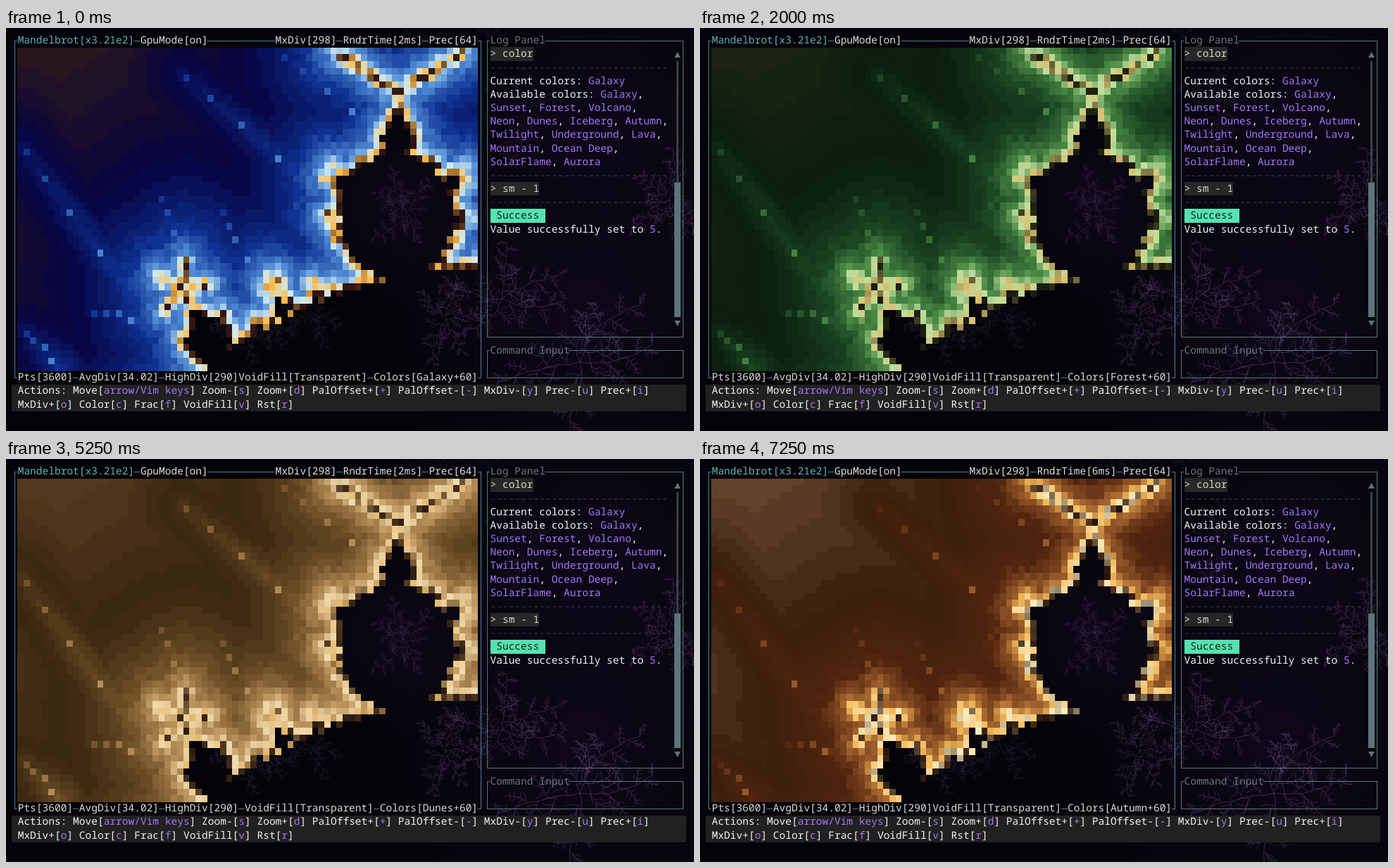
Write an HTML page with a canvas that moves like this. It is 977 by 573 pixels and loops after 8 s.

```html
<!DOCTYPE html>
<html lang="en">
<head>
<meta charset="utf-8">
<title>Fractal explorer</title>
<style>
html, body { margin: 0; width: 100%; height: 100%; overflow: hidden; background: #040309; }
canvas { position: absolute; left: 0; top: 0; }
span {
  position: absolute; white-space: pre; height: 19.16px;
  font: 500 14.52px/19.16px "Noto Sans Mono", "DejaVu Sans Mono", monospace;
  text-rendering: geometricPrecision; font-variant-ligatures: none;
}
</style>
</head>
<body>
<canvas id="back" width="977" height="573"></canvas>
<canvas id="view" width="977" height="573"></canvas>
<script>
const W = 977, H = 573, CW = 8.712, RH = 19.16, X0 = 8, Y0 = 8.7;
const COLS = 75, ROWS = 48, LOOP = 8000, DEG = Math.PI / 180;
const colX = c => X0 + c * CW, rowY = r => Y0 + r * RH;
const back = document.getElementById('back').getContext('2d');
const view = document.getElementById('view').getContext('2d');

let seed = 7;
const rnd = () => (seed = (seed * 16807) % 2147483647) / 2147483647;
const clamp = (v, lo, hi) => Math.max(lo, Math.min(hi, v));
const polar = (x, y, a, r) => [x + Math.cos(a) * r, y - Math.sin(a) * r];

// name, start time, render time, cyclic colours from the far exterior inwards
const THEMES = [
  ['Galaxy', 0, 2, '2f1a16 070340 0d3090 4f8ad4 d0ecf4 fcbc50 301410'],
  ['Sunset', 1130, 2, '46160f 22091f 5a2236 b4546e f6b0b0 fcb050 3a0c14'],
  ['Forest', 2000, 2, '1e2612 0a1c0e 1a4422 4a8a44 c0e0a0 d8c070 181c0c'],
  ['Volcano', 3000, 2, '3c140c 240c05 641a0c c04c1a f8a838 ffe27c 1c0a08'],
  ['Neon', 4250, 2, '3a2450 0c0b1e 16265a 5a5cac dcc4f2 d894e0 1c0a28'],
  ['Dunes', 5250, 2, '5a3c20 38260f 705028 bc945c f0dcb0 e4b870 2c1c10'],
  ['Iceberg', 6250, 4, '021420 28343c 62989f c8e6ec ecfaff 48b4cc 142848'],
  ['Autumn', 7250, 6, '6c4a32 3a200c 50240f a0602c f4bc5c faecc0 241208']
].map(([name, at, ms, hex]) => ({
  name, at, ms,
  stops: hex.split(' ').map(h => [0, 2, 4].map(i => parseInt(h.substr(i, 2), 16)))
}));

// ---- the set, in cell units: bulbs grow smaller bulbs, and each ends in an antenna ----
const discs = [], spikes = [];
const gcd = (a, b) => b ? gcd(b, a % b) : a;

function antenna(x, y, r, dir, q) {
  const fade = 0.25 + 0.35 / r;
  const hub = polar(x, y, dir, r * (1.1 + 0.3 * Math.min(q, 6)));
  spikes.push([...polar(x, y, dir, r), ...hub, fade]);
  for (let k = 1; k < q; k++)
    spikes.push([...hub, ...polar(...hub, dir + Math.PI + 2 * Math.PI * k / q, 1.25 * r), fade]);
}

function bulb(x, y, r, dir, q) {
  discs.push([x, y, r]);
  if (q > 2) antenna(x, y, r, dir, q);
  for (let n = 2; n < 15; n++) {
    const size = 1.06 * r / (n * n);
    if (size < 0.3) break;
    for (let p = 1; p < n; p++) {
      if (gcd(p, n) > 1) continue;
      const a = dir + Math.PI + 2 * Math.PI * p / n;
      const [cx, cy] = polar(x, y, a, r + 0.95 * size);
      if (cx > -2 && cx < COLS + 6 && cy > -2 && cy < ROWS + 2)
        bulb(cx, cy, size, a - 0.02 * size, n);
    }
  }
}
bulb(77, 111.2, 78.6, 160 * DEG, 1);

// thin filaments from faint tip to base
const THREADS = [
  [26.8, 4, 47, 19.2], [0.5, 14.5, 17, 34.5], [23.5, 22.3, 27, 32.5], [33.3, 24.2, 38, 33],
  [1, 41.8, 7, 47.6], [42.6, 1, 58, 11.5], [12, 39.3, 20, 40.2]
];

function segment(x, y, [ax, ay, bx, by]) {
  const dx = bx - ax, dy = by - ay;
  const t = clamp(((x - ax) * dx + (y - ay) * dy) / (dx * dx + dy * dy), 0, 1);
  return [Math.hypot(x - ax - t * dx, y - ay - t * dy), t];
}

// palette position of a cell, or -1 inside the set
function level(x, y) {
  let d = Math.min(...discs.map(([cx, cy, r]) => Math.hypot(x - cx, y - cy) - r));
  if (d < 0) return -1;
  for (const s of spikes) d = Math.min(d, segment(x, y, s)[0] + s[4]);
  for (const s of THREADS) {
    const [off, t] = segment(x, y, s);
    d = Math.min(d, 2 * off + 11 - 6 * t);
  }
  const a = rnd(), b = rnd();
  let p = 6.6 - 1.2 * Math.log2(Math.max(d, 0.4));
  if (d < 7) p += (a - 0.5) * Math.min(1.4, 2.4 / d);
  p += 4 * b * clamp(1.7 - d, 0, 1);
  return Math.max(0, p < 4 ? Math.round(p * 3) / 3 : p);
}

const field = [];
for (let j = 0; j < ROWS; j++)
  for (let i = 0; i < COLS; i++) field.push(level(i + 0.5, j + 0.5));

// bright specks along the filaments
for (const [ax, ay, bx, by] of THREADS)
  for (const t of [0.05, 0.25, 0.5, 0.8]) {
    const k = Math.floor(ay + (by - ay) * t) * COLS + Math.floor(ax + (bx - ax) * t);
    if (field[k] >= 0) field[k] = Math.max(field[k], 3.6 + 2 * t);
  }

function shade(stops, p) {
  const n = stops.length, s = p / 1.8, i = Math.floor(s), f = s - i;
  const a = stops[i % n], b = stops[(i + 1) % n];
  return `rgb(${a.map((v, k) => Math.round(v + (b[k] - v) * f))})`;
}

// ---- backdrop ----
function twig(x, y, ang, len, depth) {
  const steps = 8;
  for (let i = 0; i < steps; i++) {
    ang += (rnd() - 0.5) * 0.7;
    const [nx, ny] = polar(x, y, ang, len / steps);
    back.beginPath();
    back.moveTo(x, y);
    back.lineTo(nx, ny);
    back.stroke();
    x = nx; y = ny;
    if (depth) twig(x, y, ang + (i % 2 ? 1 : -1) * (0.8 + rnd() * 0.4), len * (0.4 - i * 0.035), depth - 1);
  }
}

function drawBackdrop() {
  back.fillStyle = '#040309';
  back.fillRect(0, 0, W, H);
  for (const [x, y, r] of [[820, 400, 300], [560, 250, 150], [840, 130, 240]]) {
    const g = back.createRadialGradient(x, y, 0, x, y, r);
    g.addColorStop(0, '#0e0819');
    g.addColorStop(1, '#0e081900');
    back.fillStyle = g;
    back.fillRect(0, 0, W, H);
  }
  // x, y, reach, strength
  const hubs = [
    [815, 475, 115, 0.38], [705, 385, 95, 0.32], [625, 415, 65, 0.26], [568, 262, 60, 0.2],
    [942, 245, 75, 0.28], [425, 405, 60, 0.15], [345, 440, 55, 0.14], [735, 120, 70, 0.12], [625, 8, 70, 0.12]
  ];
  for (const [x, y, reach, power] of hubs) {
    back.strokeStyle = `rgba(122,98,148,${power})`;
    const turn = rnd() * 6;
    for (let i = 0; i < 5; i++)
      twig(x, y, turn + i * 72 * DEG, reach * (0.7 + rnd() * 0.4), 2);
  }
}

// ---- frames ----
const bar = (g, x0, y0, x1, y1) => g.fillRect(x0, y0, x1 - x0, y1 - y0);

// horizontal border that leaves room for [column, length] labels
function rule(g, row, from, to, labels) {
  const y = Math.floor(rowY(row + 0.5));
  for (let c = from; c <= to; c++) {
    if (labels.some(([s, n]) => c >= s && c < s + n)) continue;
    const x0 = Math.floor(colX(c === from ? c + 0.5 : c));
    const x1 = Math.floor(colX(c === to ? c + 0.5 : c + 1));
    bar(g, x0, y, x1, y + 1);
  }
}

function posts(g, c0, c1, r0, r1) {
  for (const c of [c0, c1]) {
    const x = Math.floor(colX(c + 0.5));
    bar(g, x, Math.floor(rowY(r0 + 0.5)), x + 1, Math.floor(rowY(r1 + 0.5)) + 1);
  }
}

function box(c0, c1, r0, r1, title) {
  rule(back, r0, c0, c1, [[c0 + 1, title.length]]);
  rule(back, r1, c0, c1, []);
  posts(back, c0, c1, r0, r1);
  put(c0 + 1, r0, title, DIM);
}

function drawScrollbar() {
  const x0 = 949, x1 = 958;
  bar(back, x0, rowY(11), x1, rowY(21));
  for (const [y, h] of [[42, -8], [416, 8]]) {
    back.beginPath();
    back.moveTo(x0, y);
    back.lineTo(x1, y);
    back.lineTo((x0 + x1) / 2, y + h);
    back.fill();
  }
  back.fillStyle = '#364249';
  bar(back, 952, rowY(2), 955, rowY(11));
}

// ---- text ----
const TEXT = '#f2f2f2', LABEL = '#dcdcd6', ACCENT = '#a477f8', DIM = '#6a757b';

function put(col, row, text, color = TEXT, bg = '') {
  const el = document.createElement('span');
  el.textContent = text;
  el.style.left = colX(col) + 'px';
  el.style.top = rowY(row) - 0.4 + 'px';
  el.style.color = color;
  el.style.background = bg;
  document.body.append(el);
  return el;
}

// text in braces takes the accent colour
function rich(col, row, text) {
  text.split(/[{}]/).forEach((part, i) => {
    if (part) put(col, row, part, i % 2 ? ACCENT : TEXT);
    col += part.length;
  });
}

function drawText() {
  put(1, 0, 'Mandelbrot[x3.21e2]', '#62b0b4');
  put(21, 0, 'GpuMode[on]', LABEL);
  put(43, 0, 'MxDiv[298]', LABEL);
  put(68, 0, 'Prec[64]', LABEL);
  put(1, 25, 'Pts[3600]', LABEL);
  put(11, 25, 'AvgDiv[34.02]', LABEL);
  put(25, 25, 'HighDiv[290]', LABEL);

  put(78, 1, '> color', '#d8d8c8', '#262827');
  put(78, 11, '> sm - 1', '#d8d8c8', '#262827');
  for (const r of [2, 10, 12]) put(78, r, '-'.repeat(29), '#3b3843');
  [
    'Current colors: {Galaxy}', 'Available colors: {Galaxy},', '{Sunset}, {Forest}, {Volcano},',
    '{Neon}, {Dunes}, {Iceberg}, {Autumn},', '{Twilight}, {Underground}, {Lava},',
    '{Mountain}, {Ocean Deep},', '{SolarFlame}, {Aurora}'
  ].forEach((s, i) => rich(78, 3 + i, s));
  put(78, 13, ' Success ', '#10201a', '#56e2b0');
  rich(78, 14, 'Value successfully set to {5}.');
  rich(1, 26, 'Actions: Move[{arrow/Vim keys}] Zoom-[{s}] Zoom+[{d}] PalOffset+[{+}] PalOffset-[{-}] MxDiv-[{y}] Prec-[{u}] Prec+[{i}]');
  rich(1, 27, 'MxDiv+[{o}] Color[{c}] Frac[{f}] VoidFill[{v}] Rst[{r}]');
}

// ---- animation ----
const timeLabel = put(54, 0, '', LABEL);
const fillLabel = put(37, 25, '', LABEL);
const colorLabel = put(59, 25, '', LABEL);
const cellX = i => Math.round(colX(1 + i) - 0.3), cellY = j => Math.round(rowY(1 + j / 2));

function show(theme) {
  view.clearRect(0, 0, W, H);
  field.forEach((p, k) => {
    if (p < 0) return;
    const i = k % COLS, j = (k - i) / COLS;
    view.fillStyle = shade(theme.stops, p);
    bar(view, cellX(i), cellY(j), cellX(i + 1), cellY(j + 1));
  });

  const colors = `Colors[${theme.name}+60]`, fill = 'VoidFill[Transparent]';
  const colorCol = 76 - colors.length, fillCol = colorCol - 1 - fill.length;
  const cut = Math.max(0, 37 - fillCol);
  timeLabel.textContent = `RndrTime[${theme.ms}ms]`;
  colorLabel.textContent = colors;
  colorLabel.style.left = colX(colorCol) + 'px';
  fillLabel.textContent = fill.slice(cut);
  fillLabel.style.left = colX(fillCol + cut) + 'px';

  view.fillStyle = '#4a819b';
  rule(view, 0, 0, 76, [[1, 19], [21, 11], [43, 10], [54, 13], [68, 8]]);
  rule(view, 25, 0, 76, [[1, 9], [11, 13], [25, 12], [fillCol, fill.length], [colorCol, colors.length]]);
  posts(view, 0, 76, 0, 25);
}

let current = null;
function tick() {
  const t = performance.now() % LOOP;
  const theme = THEMES.filter(s => s.at <= t).pop();
  if (theme !== current) show(current = theme);
  requestAnimationFrame(tick);
}

drawBackdrop();
back.fillStyle = '#212121';
bar(back, 8, 507, 966, 545);
back.fillStyle = '#5c747b';
box(77, 109, 0, 22, 'Log Panel');
box(77, 109, 23, 25, 'Command Input');
drawScrollbar();
drawText();
tick();
</script>
</body>
</html>
```
